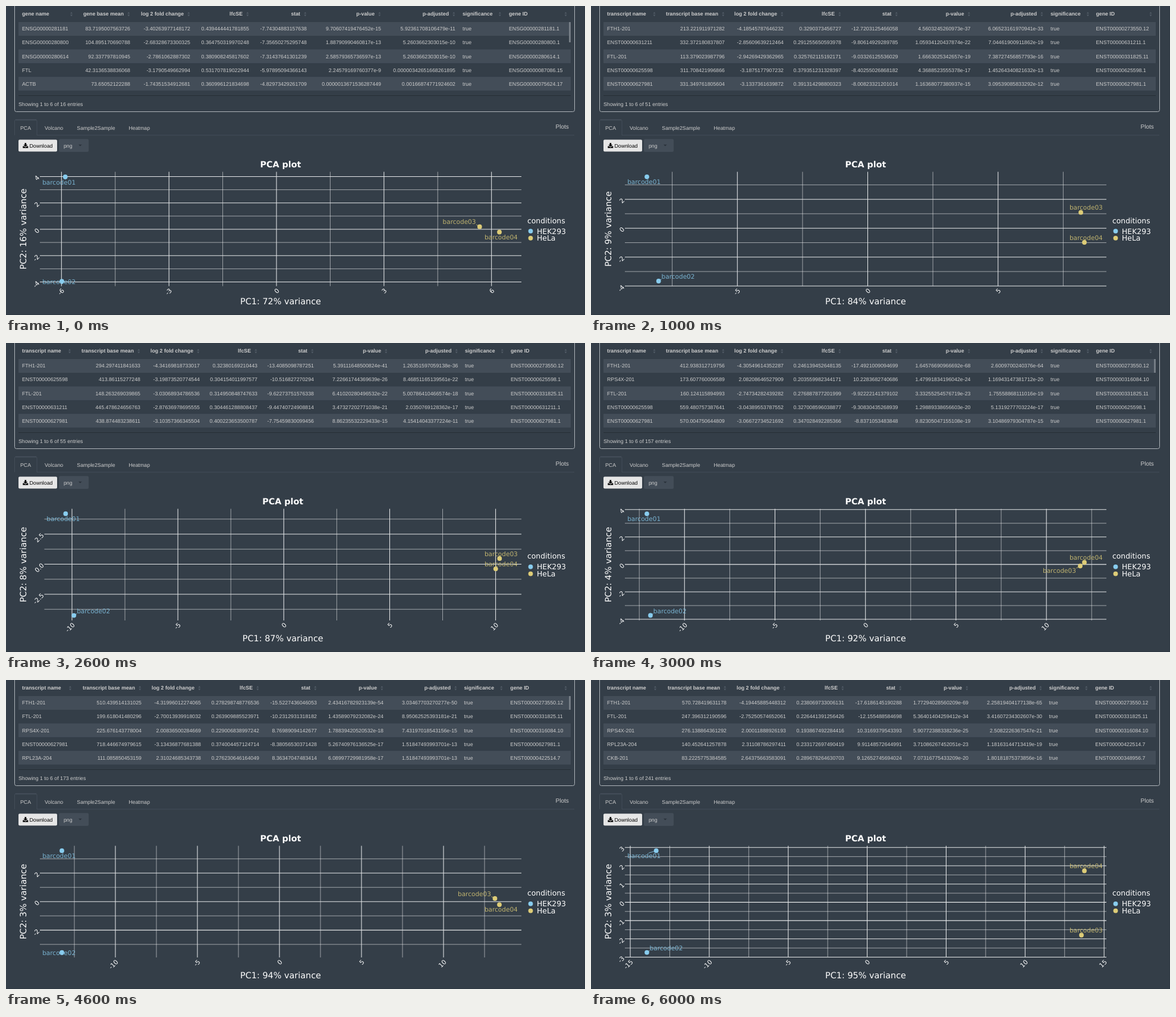
Recreate the animation shown at these times as an HTML page. Size 974x519 px, loop 7 s.

```html
<!DOCTYPE html>
<html lang="en">
<head>
<meta charset="utf-8">
<title>PCA plots</title>
<style>
html, body { margin: 0; width: 100%; height: 100%; overflow: hidden; background: #2d3741; }
svg { display: block; text-rendering: geometricPrecision; }
text { font: 8.75px "Liberation Sans", Arial, sans-serif; fill: #cdcdcd; white-space: pre; }
.head { font-weight: bold; }
.end { text-anchor: end; }
.mid { text-anchor: middle; }
.plot text { font: 10.5px "DejaVu Sans", sans-serif; fill: #fff; }
.plot .title { font-size: 14.4px; }
.plot .bold { font-weight: bold; font-size: 14.3px; }
.plot .key { font-size: 12.4px; }
.plot .tag { fill: inherit; opacity: .82; }
.major { stroke: #e4e6e8; stroke-width: 1.07; }
.minor { stroke: #fff; stroke-width: .53; }
</style>
</head>
<body>
<svg width="974" height="519" viewBox="0 0 974 519">
  <path fill="#343e48" d="M0 0h973v518H0z"/>
  <path fill="none" stroke="#aeb4b9" d="M14.5-5V174.500q0 3 3 3H953.500q3 0 3-3V-5"/>
  <path fill="#434d58" d="M21 27h929v23H21zM21 73h929v23H21zM21 119h929v23H21z"/>
  <path stroke="#262e36" d="M21 150.500H950"/>
  <path stroke="#434d58" fill="none" d="M14.500 217V193q0-2 2-2h33.500q2 0 2 2v24H956"/>
  <path stroke="#434d58" stroke-width="2" d="M16 191.200H51"/>
  <text x="24" y="208">PCA</text>
  <text x="65" y="208">Volcano</text>
  <text x="119.300" y="208">Sample2Sample</text>
  <text x="206.500" y="208">Heatmap</text>
  <text x="924.500" y="206" style="font-size:10px">Plots</text>
  <rect x="21" y="224.500" width="65" height="20" rx="2" fill="#e6e6e6"/>
  <path d="M31.500 230h2.600v3h2.200l-3.500 3.500-3.500-3.500h2.200zM28.300 235.600h2.200l2.300 2 2.300-2h2.200v3h-9z"/>
  <text x="39.500" y="237.500" style="fill:#000">Download</text>
  <rect x="89" y="223.500" width="50" height="21.500" rx="2" fill="#434d58"/>
  <text x="97" y="237.500">png</text>
  <path fill="#29323a" d="M122 232.800h5.600l-2.800 2.800z"/>
  <g id="scene"></g>
</svg>
<script>
// Columns: icon of the name column, right edges of six number headings, significance, ID
const colsGene = [110, 198, 299, 398, 495, 620, 745, 768, 846];
const colsA = [106.5, 214, 313, 410, 505.5, 627.5, 750, 773, 849.5];
const colsB = [107, 215, 315, 412, 507, 631, 749.5, 772, 849];
const colsC = [108, 217, 317, 415, 512, 624, 748, 770.5, 848.3];

// x, y: [pixel of zero, pixels per unit, major step]
// points: [x, y, label x, label centre y, optional leader end x]
const scenes = [
  { kind: 'gene', cols: colsGene, total: 16, thumb: 34, pc: [72, 16], bottom: 470.5,
    x: [455, 60.28, 3], y: [375, 22.14, 2],
    points: [[99.7, 287, 61.2, 296], [94, 462.3, 61.2, 463], [796.8, 370.7, 734.6, 362.7], [830, 379.7, 804.9, 388]],
    rows: `ENSG00000281181 83.7195007563726 -3.40263977148172 0.439444441781855 -7.74304883157638 9.70607419476452e-15 5.92361708106479e-11 ENSG00000281181.1
ENSG00000280800 104.895170690788 -2.68328673300325 0.364750319970248 -7.35650275295748 1.88790990460817e-13 5.2603662303015e-10 ENSG00000280800.1
ENSG00000280614 92.337797810945 -2.7861062887302 0.380908245817602 -7.31437641301239 2.58579365736597e-13 5.2603662303015e-10 ENSG00000280614.1
FTL 42.3136538836068 -3.1790549662994 0.531707819022944 -5.97895094366143 2.24579169760377e-9 0.00000342651668261895 ENSG00000087086.15
ACTB 73.65052122288 -1.74351534912681 0.360996121834698 -4.82973429261709 0.0000013671536287449 0.00166874771924602 ENSG00000075624.17` },
  { kind: 'transcript', cols: colsA, total: 51, pc: [84, 9], bottom: 470.5,
    x: [465.5, 43.85, 5], y: [373.2, 24.27, 2],
    points: [[94, 286.8, 61.2, 295.7], [113.7, 462, 118.6, 454.3], [824, 346.7, 804.9, 338], [830, 397, 804.9, 389]],
    rows: `FTH1-201 213.221911971282 -4.18545787646232 0.3290373456727 -12.7203125466058 4.5603245260973e-37 6.06523161970941e-33 ENST00000273550.12
ENST00000631211 332.372180837807 -2.85609639212464 0.291255650593978 -9.80614929289785 1.05934120437874e-22 7.04461900911862e-19 ENST00000631211.1
FTL-201 113.379023987796 -2.94269429362965 0.325762115192171 -9.03326125536029 1.6663025342657e-19 7.38727456857793e-16 ENST00000331825.11
ENST00000625598 311.708421996866 -3.1875177907232 0.379351231328397 -8.40255026868182 4.3688523555378e-17 1.45264340821632e-13 ENST00000625598.1
ENST00000627981 331.349761805604 -3.1337361639872 0.391314298800323 -8.00823321201014 1.16368077380937e-15 3.09539085833292e-12 ENST00000627981.1` },
  { kind: 'transcript', cols: colsB, total: 55, pc: [87, 8], left: 64.5,
    x: [467.3, 35.63, 5], y: [371.5, 20.2, 2.5],
    points: [[100.3, 286.7, 68.3, 295], [114.2, 457.6, 119.2, 450], [830.3, 362, 804.9, 354], [823.8, 379.3, 804.9, 371]],
    rows: `FTH1-201 294.297411841633 -4.34169818733017 0.32380169210443 -13.4085098787251 5.39111648500824e-41 1.26351597059138e-36 ENST00000273550.12
ENST00000625598 413.86115277248 -3.19873520774544 0.304154011997577 -10.516827270294 7.22661744369639e-26 8.46851165139561e-22 ENST00000625598.1
FTL-201 148.263269039865 -3.03068934786536 0.314950848747633 -9.62273751576338 6.41020280496532e-22 5.00786410466574e-18 ENST00000331825.11
ENST00000631211 445.478624656763 -2.87636978695555 0.304461288808437 -9.44740724908814 3.47327202771038e-21 2.0350769128362e-17 ENST00000631211.1
ENST00000627981 438.874483238611 -3.10357366345504 0.400223653500787 -7.75459830099456 8.86235532229433e-15 4.15414043377224e-11 ENST00000627981.1` },
  { kind: 'transcript', cols: colsA, total: 157, thumb: 23, pc: [92, 4],
    x: [461.7, 30.44, 5], y: [371.9, 23.04, 2],
    points: [[94, 286.8, 61.2, 295], [100, 457.5, 104.8, 450], [823, 374.5, 760, 382.7], [830, 368.5, 804.9, 360]],
    rows: `FTH1-201 412.938312719756 -4.30549614352287 0.246139452648135 -17.4921009094699 1.64576690966692e-68 2.6009700240376e-64 ENST00000273550.12
RPS4X-201 173.607760006589 2.08208646527909 0.203559982344171 10.2283682740686 1.47991834196042e-24 1.16943147381712e-20 ENST00000316084.10
FTL-201 160.124115894993 -2.74734282439282 0.276887877201999 -9.92222141379102 3.33255254576719e-23 1.75558868111016e-19 ENST00000331825.11
ENST00000625598 559.480757387641 -3.04389553787552 0.327008596038877 -9.30830435268939 1.29889338656603e-20 5.1319277703224e-17 ENST00000625598.1
ENST00000627981 570.004750644809 -3.06672734521692 0.347028492285366 -8.8371053483848 9.82305047155108e-19 3.10486979304787e-15 ENST00000627981.1` },
  { kind: 'transcript', cols: colsC, total: 173, thumb: 23, pc: [94, 3],
    x: [460, 27.6, 5], y: [372.2, 23.95, 2],
    points: [[94, 286.7, 61.2, 295], [94, 457.7, 61.2, 458.3], [822.5, 367, 760, 359.3], [830, 377.3, 804.9, 385.7]],
    rows: `FTH1-201 510.439514131025 -4.31996012274065 0.278298748776536 -15.5227436046053 2.43416782923139e-54 3.03467703270277e-50 ENST00000273550.12
FTL-201 199.618041480296 -2.70013939918032 0.263909885523971 -10.2312931318182 1.43589079232082e-24 8.95062525393181e-21 ENST00000331825.11
RPS4X-201 225.676143778004 2.00836500284669 0.229006838997242 8.76989094142677 1.78839420520532e-18 7.43197018543156e-15 ENST00000316084.10
ENST00000627981 718.446674979615 -3.13436877681388 0.374004457124714 -8.38056530371428 5.26740976136525e-17 1.51847493993701e-13 ENST00000627981.1
RPL23A-204 111.085850453159 2.31024685343738 0.276230646164049 8.36347047483414 6.08997729981958e-17 1.51847493993701e-13 ENST00000422514.7` },
  { kind: 'transcript', cols: colsC, total: 225, pc: [95, 3],
    x: [464.6, 26.42, 5], y: [371.2, 34.65, 1],
    points: [[108.3, 292.5, 61.2, 301, 97], [94, 448, 61.2, 456.5], [826, 457.7, 804.9, 449.7], [830, 286.8, 804.9, 286.7]],
    rows: `FTH1-201 598.106568533791 -4.2875080658554 0.24608746828478 -17.4226997243669 5.54957054868388e-68 6.90311080550788e-64 ENST00000273550.12
FTL-201 245.566661753745 -2.76386349708987 0.23519422609141 -11.7514087952809 6.94512123974894e-32 4.31951815506185e-28 ENST00000331825.11
RPS4X-201 272.227819208454 2.00459926503919 0.205914775068641 9.73509193000337 2.13624450307503e-22 8.85758179125009e-19 ENST00000316084.10
RPL23A-204 138.258632808282 2.33247791633036 0.24698931289528 9.44363903437107 3.60052734263889e-21 1.11967399037713e-17 ENST00000422514.7
CKB-201 82.103755095321 2.64051935690734 0.30308216239421 8.71222290367882 2.97973018751881e-18 7.41297276050929e-15 ENST00000348956.7` },
  { kind: 'transcript', cols: colsC, total: 241, pc: [95, 3],
    x: [464.6, 26.57, 5], y: [373.4, 30.7, 1],
    points: [[109.7, 286.7, 61.2, 295, 97], [94, 457.6, 98.6, 450], [825, 428.5, 804.9, 420.5], [830, 320.5, 804.9, 312]],
    rows: `FTH1-201 570.728419631178 -4.19445885448312 0.238069733006131 -17.6186145190288 1.77294028560209e-69 2.25819404177138e-65 ENST00000273550.12
FTL-201 247.396312190596 -2.75250574652061 0.226441391256426 -12.155488584698 5.36401404259412e-34 3.41607234302607e-30 ENST00000331825.11
RPS4X-201 276.138864361292 2.00011888926193 0.193867492284416 10.3169379543393 5.90772388338236e-25 2.5082226367547e-21 ENST00000316084.10
RPL23A-204 140.452641257878 2.31108786297411 0.233172697490419 9.91148572644991 3.71086267452051e-23 1.18163144713419e-19 ENST00000422514.7
CKB-201 83.2225775384585 2.64375663583091 0.289678264630703 9.12652745694024 7.07316775433209e-20 1.80181875373856e-16 ENST00000348956.7` }
];

const blue = '#88ccee', yellow = '#ddcc77';
const panelTop = 278.5, panelRight = 867;

const text = (x, y, str, cls = '', rest = '') => `<text x="${x}" y="${y}" class="${cls}" ${rest}>${str}</text>`;
const line = (x1, y1, x2, y2, cls) => `<path class="${cls}" d="M${x1} ${y1}L${x2} ${y2}"/>`;
const dot = (x, y, fill) => `<circle cx="${x}" cy="${y}" r="3.9" fill="${fill}"/>`;
const sortIcon = x => `<path fill="#525c67" d="M${x - 2} 12.8h4l-2-2.800zM${x - 2} 14.600h4l-2 2.800z"/>`;
const tilted = (x, y, str) => text(0, 3.8, str, 'end', `transform="translate(${x} ${y}) rotate(-45)"`);
const clamp = (v, lo, hi) => Math.min(Math.max(v, lo), hi);

function table({ kind, cols, total, thumb, rows }) {
  const [icon, ...edges] = cols;
  const idX = edges.pop(), sigX = edges.pop();
  const heads = [kind + ' base mean', 'log 2 fold change', 'lfcSE', 'stat', 'p-value', 'p-adjusted'];
  let out = text(27, 16.2, kind + ' name', 'head') + text(sigX, 16.2, 'significance', 'head') +
    text(idX, 16.2, 'gene ID', 'head') + [icon, sigX + 62.8, 941.5].map(sortIcon).join('');
  edges.forEach((x, i) => out += text(x, 16.2, heads[i], 'head end') + sortIcon(x + 8.3));
  rows.split('\n').forEach((row, r) => {
    const y = 41.2 + 23.15 * r, cells = row.split(' ');
    out += text(27, y, cells[0]) + text(sigX, y, 'true') + text(idX, y, cells[7]);
    edges.forEach((x, i) => out += text(x + 10.9, y, cells[i + 1], 'end'));
  });
  if (thumb) out += `<rect x="947" y="27" width="3" height="${thumb}" fill="#747c84"/>`;
  return out + text(21, 167.5, `Showing 1 to 6 of ${total} entries`);
}

// Calls draw(position, value) at every half step; the value is null on minor lines
function ticks([zero, scale, step], lo, hi, draw) {
  const half = scale * step / 2;
  for (let k = Math.ceil((lo - zero) / half); k <= (hi - zero) / half; k++)
    draw(zero + k * half, k % 2 ? null : k / 2 * step);
}

function plot({ pc, x, y, points, left = 57, bottom = 466 }) {
  const midX = (left + panelRight) / 2, midY = (panelTop + bottom) / 2;
  const decimals = y[2] % 1 ? 1 : 0;
  let minor = '', major = '', labels = '';
  const grid = (value, ...ends) => {
    if (value === null) minor += line(...ends, 'minor');
    else major += line(...ends, 'major');
  };
  ticks(x, left, panelRight, (p, value) => {
    grid(value, p, panelTop, p, bottom);
    if (value !== null) labels += tilted(p + 2.8, bottom + 5.5, value.toFixed(0));
  });
  const flip = v => 2 * y[0] - v;
  ticks(y, flip(bottom), flip(panelTop), (q, value) => {
    const p = flip(q);
    grid(value, left, p, panelRight, p);
    if (value !== null) labels += tilted(left - 2.6, p, value.toFixed(decimals));
  });
  const marks = points.map(([px, py, lx, cy, endX], i) => {
    const color = i < 2 ? blue : yellow;
    const ex = endX ?? clamp(px, lx, lx + 56.5), ey = clamp(py, cy - 4.5, cy + 4.5);
    return `<g fill="${color}"><path d="M${px} ${py}L${ex} ${ey}" stroke="${color}" stroke-width=".8"/>` +
      dot(px, py, color) + text(lx, cy + 3.7, 'barcode0' + (i + 1), 'tag') + '</g>';
  }).join('');
  return '<g class="plot">' + minor + major + labels + marks +
    text(midX, 271.2, 'PCA plot', 'bold mid') +
    text(midX, 501.2, `PC1: ${pc[0]}% variance`, 'title mid') +
    text(0, 0, `PC2: ${pc[1]}% variance`, 'title mid', `transform="translate(34.3 ${midY}) rotate(-90)"`) +
    text(876.9, midY - 10, 'conditions', 'key') +
    dot(882.5, midY + 3.6, blue) + text(893, midY + 8.1, 'HEK293', 'key') +
    dot(882.5, midY + 15.3, yellow) + text(893, midY + 19.9, 'HeLa', 'key') + '</g>';
}

const pages = scenes.map(s => table(s) + plot(s));
const stage = document.getElementById('scene');
let shown = -1;

function tick() {
  const index = Math.floor(performance.now() / 1000) % pages.length;
  if (index !== shown) stage.innerHTML = pages[shown = index];
  requestAnimationFrame(tick);
}
tick();
</script>
</body>
</html>
```
